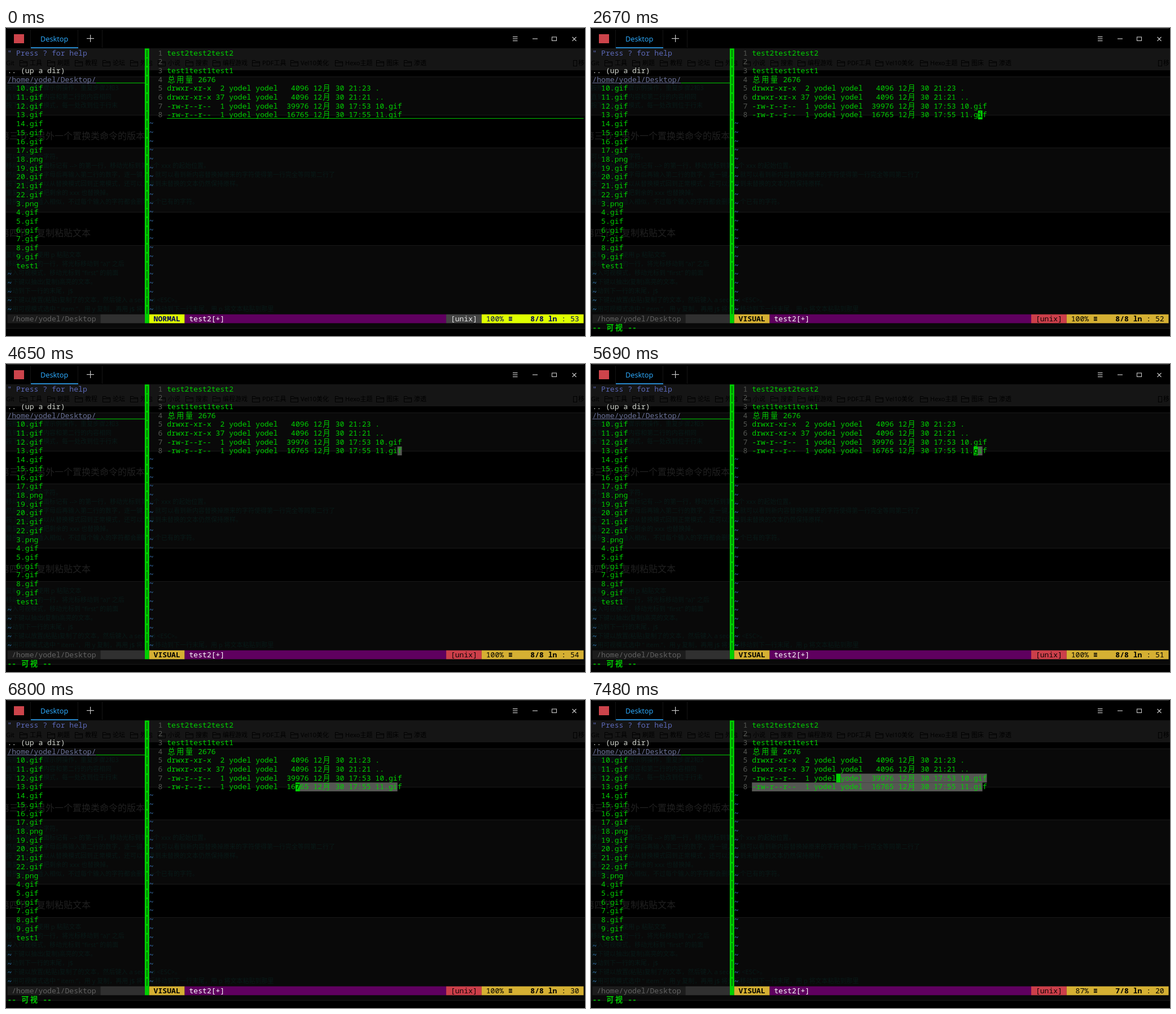
An HTML page with a canvas that plays this animation: 1026 px wide and 546 px high, repeating every 8000 ms.

```html
<!DOCTYPE html>
<html lang="zh">
<head>
<meta charset="utf-8">
<title>Terminal</title>
<style>
html, body { margin: 0; width: 100%; height: 100%; overflow: hidden; background: #000; }
canvas { display: block; width: 1026px; height: 546px; }
</style>
</head>
<body>
<canvas id="stage" width="1026" height="546"></canvas>
<script>
const W = 1026, H = 546, LOOP = 8000;
const CELL = 7.855, ROW = 15.71, LEFT = 2.4, TOP = 36.3, TEXT = 36;
const MONO = '"Noto Sans Mono", "Noto Sans CJK SC", "Noto Sans CJK", monospace';
const SANS = '"Noto Sans", "Noto Sans CJK SC", "Noto Sans CJK", sans-serif';
const GREEN = '#00d000', GREY = '#555753', BLUE = '#3a7ab8', PATH = '#6b7299';
const PAGE_INK = '#202020', NOTE_INK = '#081a18', MARK_INK = '#000';
const USER = 'yodel';

const screen = document.getElementById('stage').getContext('2d');
const back = document.createElement('canvas');
back.width = W;
back.height = H;
let ctx = back.getContext('2d');

const colX = c => LEFT + c * CELL;
const rowY = r => TOP + r * ROW;
const isWide = ch => /[\u2e80-\uffef]/.test(ch);

function rect(x, y, w, h, color) {
  ctx.fillStyle = color;
  ctx.fillRect(x, y, w, h);
}

function cells(col, row, count, color) {
  rect(colX(col), rowY(row), count * CELL, ROW, color);
}

function underline(col, row, count, color) {
  rect(colX(col), rowY(row) + 13.5, count * CELL, 1, color);
}

// Every character sits on the terminal grid; CJK takes two cells.
function print(str, col, row, color, bold) {
  ctx.font = (bold ? 'bold ' : '') + '13.08px ' + MONO;
  ctx.fillStyle = color;
  ctx.textAlign = 'center';
  for (const ch of str) {
    const span = isWide(ch) ? 2 : 1;
    if (ch !== ' ') ctx.fillText(ch, colX(col + span / 2), rowY(row) + 12.2);
    col += span;
  }
}

function label(str, x, y, size, color) {
  ctx.font = size + 'px ' + SANS;
  ctx.fillStyle = color;
  ctx.textAlign = 'left';
  ctx.fillText(str, x, y);
}

function stroke(points, color, width = 1) {
  ctx.strokeStyle = color;
  ctx.lineWidth = width;
  ctx.beginPath();
  points.forEach(([x, y], i) => i ? ctx.lineTo(x, y) : ctx.moveTo(x, y));
  ctx.stroke();
}

const listing = [
  'test2test2test2',
  '',
  'test1test1test1',
  '总用量 2676',
  `drwxr-xr-x  2 ${USER} ${USER}   4096 12月 30 21:23 .`,
  `drwxr-xr-x 37 ${USER} ${USER}   4096 12月 30 21:21 ..`,
  `-rw-r--r--  1 ${USER} ${USER}  39976 12月 30 17:53 10.gif`,
  `-rw-r--r--  1 ${USER} ${USER}  16765 12月 30 17:55 11.gif`
];
const grid = listing.map(s => [...s].flatMap(ch => isWide(ch) ? [ch, ''] : [ch]));

// The web page that shines through the translucent window.
function drawPage() {
  rect(0, 0, W, H, '#000');
  rect(0, 36, W, 39, '#151515');
  for (const [y, h] of [[86, 69], [212, 115], [385, 148]]) {
    rect(0, y, W, h, '#090909');
    ctx.strokeStyle = '#191919';
    ctx.lineWidth = 1;
    ctx.strokeRect(-0.5, y + 0.5, W + 1, h - 1);
  }
  const marks = [['工具', 42], ['刷题', 91], ['教程', 140], ['论坛', 189], ['外包', 238],
    ['小说', 287], ['搜索', 336], ['编程游戏', 384], ['PDF工具', 454], ['Vel10美化', 522],
    ['Hexo主题', 601], ['图床', 674], ['渗透', 723]];
  label('Git', 0, 66, 11, MARK_INK);
  for (const [name, x] of marks) {
    label(name, x, 66, 11, MARK_INK);
    const l = x - 17.5;
    stroke([[l, 57.5], [l + 5, 57.5], [l + 6, 59.5], [l + 13, 59.5], [l + 13, 67.5],
      [l, 67.5], [l, 57], [l, 61.5], [l + 13, 61.5]], MARK_INK);
  }
  ctx.strokeRect(1005.5, 57.5, 6, 10);
  label('移', 1014, 66, 11, MARK_INK);

  label('第三节：另外一个置换类命令的版本', -10, 197, 16, PAGE_INK);
  label('第四节：复制粘贴文本', -10, 369, 16, PAGE_INK);
  const notes = [
    [110, '按照下面的步骤示例操作，重复步骤2和3'],
    [126, '直到第一行的内容和第二行的内容相同'],
    [141, '按下进入插入模式，每一处改到位于行末'],
    [232, '可以替换多个字符。'],
    [248, '移动光标到下面标记有 --> 的第一行，移动光标到第一个 xxx 的起始位置。'],
    [264, '然后输入大写字母后再输入第二行的数字，逐一键入，就可以看到新内容替换掉原来的字符使得第一行完全等同第二行了'],
    [280, '按下退出键可以从替换模式回到正常模式，还可以注意到未替换的文本仍然保持原样。'],
    [296, '重复上面步骤把剩余的 xxx 也替换掉。'],
    [312, '替换模式与插入相似，不过每个输入的字符都会删除一个已有的字符。'],
    [406, '复制文本，使用 p 粘贴文本'],
    [422, '移动到标记的一行，将光标移动到 “a)” 之后'],
    [438, '进入可视模式，移动光标到 “first” 的前面'],
    [454, '按下键以抽出(复制)高亮的文本。'],
    [470, '移动到下一行的末尾，j$'],
    [486, '按下键以放置(粘贴)复制了的文本，然后键入 a second <ESC>。'],
    [502, '使用可视模式选中 “ item.”，用 y 复制，再用 j$ 将光标移动到下一行末尾，用 p 将文本粘贴到那里']
  ];
  for (const [y, line] of notes) label(line, 0, y, 11, NOTE_INK);
}

function drawChrome() {
  rect(0, 0, W, 36, 'rgba(0,0,0,.92)');
  rect(2, 0, W - 4, 1, '#393939');
  rect(14, 11, 18, 16, '#cc444b');
  for (const x of [43, 127, 170]) rect(x, 3, 1, 32, '#141414');
  label('Desktop', 61, 24, 12.7, '#2ca7f8');
  rect(44, 34, 84, 2, '#2787ca');
  const ink = '#c8c8c8';
  rect(143, 18, 13, 1.2, ink);
  rect(149, 12, 1.2, 13, ink);
  for (const y of [15, 18.5, 22]) rect(898, y, 8.5, 1.2, ink);
  rect(933, 18.5, 9, 1.2, ink);
  ctx.strokeStyle = ink;
  ctx.lineWidth = 1.1;
  ctx.strokeRect(967.5, 16, 8, 6.5);
  stroke([[1003.5, 16], [1010.5, 23]], ink, 1.1);
  stroke([[1010.5, 16], [1003.5, 23]], ink, 1.1);
}

function drawPanes() {
  print('" Press ? for help', 0, 0, '#5c69b8');
  print('.. (up a dir)', 0, 2, '#d3d7cf');
  print(`/home/${USER}/Desktop/`, 0, 3, PATH);
  underline(0, 3, 20, PATH);
  underline(20, 3, 11, GREEN);
  const names = [];
  for (let i = 10; i <= 22; i++) names.push(i + (i === 18 ? '.png' : '.gif'));
  for (let i = 3; i <= 9; i++) names.push(i + (i === 3 ? '.png' : '.gif'));
  names.push('test1');
  names.forEach((name, i) => print(name, 2, 4 + i, GREEN));
  for (let r = 25; r < 30; r++) print('~', 0, r, BLUE);
  for (let r = 8; r < 30; r++) print('~', 32, r, BLUE);

  rect(colX(31), TOP, CELL, 31 * ROW, GREEN);
  for (let r = 0; r < 30; r++) print('|', 31, r, '#002000');
  listing.forEach((line, i) => {
    print(String(i + 1), 34, i, GREY);
    if (i < 6) print(line, TEXT, i, GREEN);
  });

  cells(0, 30, 21, '#1c1c1c');
  cells(21, 30, 10, '#303030');
  print(`/home/${USER}/Desktop`, 1, 30, '#626262');
}

// [time, column, cursor lit]
const moves = [
  [0, 53, 0], [510, 53, 1], [1110, 53, 0], [1580, 53, 1], [2200, 53, 0],
  [2620, 52, 1], [3220, 52, 0], [3820, 53, 1], [4080, 54, 1], [4650, 54, 0],
  [5240, 54, 1], [5410, 53, 1], [5590, 52, 1], [5690, 51, 1]
];

function cursorAt(t) {
  const row = t < 7480 ? 7 : 6;
  if (t < 5940) {
    const [, col, lit] = moves.filter(m => m[0] <= t).pop();
    return { row, col, lit };
  }
  // Held key: one character every 45.5 ms; the wide one is crossed in one step.
  const steps = Math.min(29, Math.floor((t - 5940) / 45.5 + 0.3));
  return { row, col: 50 - steps - (steps >= 13 ? 1 : 0), lit: 1 };
}

function drawStatus(t, cur) {
  const visual = t >= 1620;
  const main = visual ? '#d5b033' : '#dfff00';
  const ink = visual ? '#000' : '#00005f';
  // The column counter trails the cursor by one redraw.
  let col = cur.col;
  if (t >= 2620 && t < 2670) col = 53;
  if (t >= 3820 && t < 3870) col = 52;

  cells(32, 30, 8, main);
  cells(40, 30, 59, '#5f005f');
  cells(99, 30, 8, visual ? '#cc3f4a' : '#444');
  cells(107, 30, 23, main);
  print(visual ? 'VISUAL' : 'NORMAL', 33, 30, ink, true);
  print('test2[+]', 41, 30, '#fff');
  print('[unix]', 100, 30, visual ? '#100406' : '#e4e4e4');
  print(cur.row === 7 ? '100%' : ' 87%', 108, 30, ink);
  print('≡', 113, 30, ink, true);
  print(`${cur.row + 1}/8 ln`, 118, 30, ink, true);
  print(': ' + col, 125, 30, ink);
}

function drawSelection(cur) {
  const fill = (row, from, to) => {
    if (to > from) cells(TEXT + from, row, to - from, GREY);
  };
  const at = cur.col - 1;
  if (cur.row === 6) {
    fill(6, at + 1, 53);
    fill(7, 0, 52);
  } else if (at > 52) {
    fill(7, 52, at);
  } else {
    fill(7, at + 1, 52);
  }
}

function draw(t) {
  const cur = cursorAt(t);
  ctx.drawImage(back, 0, 0);
  if (t >= 1580) {
    drawSelection(cur);
    print('-- 可视 --', 0, 31, GREEN, true);
  } else {
    underline(TEXT, 7, 94, GREEN);
  }
  for (const r of [6, 7]) print(listing[r], TEXT, r, GREEN);
  if (cur.lit) {
    const ch = grid[cur.row][cur.col - 1] || ' ';
    cells(TEXT + cur.col - 1, cur.row, isWide(ch) ? 2 : 1, GREEN);
    print(ch, TEXT + cur.col - 1, cur.row, '#000');
  }
  drawStatus(t, cur);
}

drawPage();
drawChrome();
drawPanes();
ctx = screen;

const start = performance.now();
function tick() {
  draw((performance.now() - start) % LOOP);
  requestAnimationFrame(tick);
}
tick();
</script>
</body>
</html>
```
